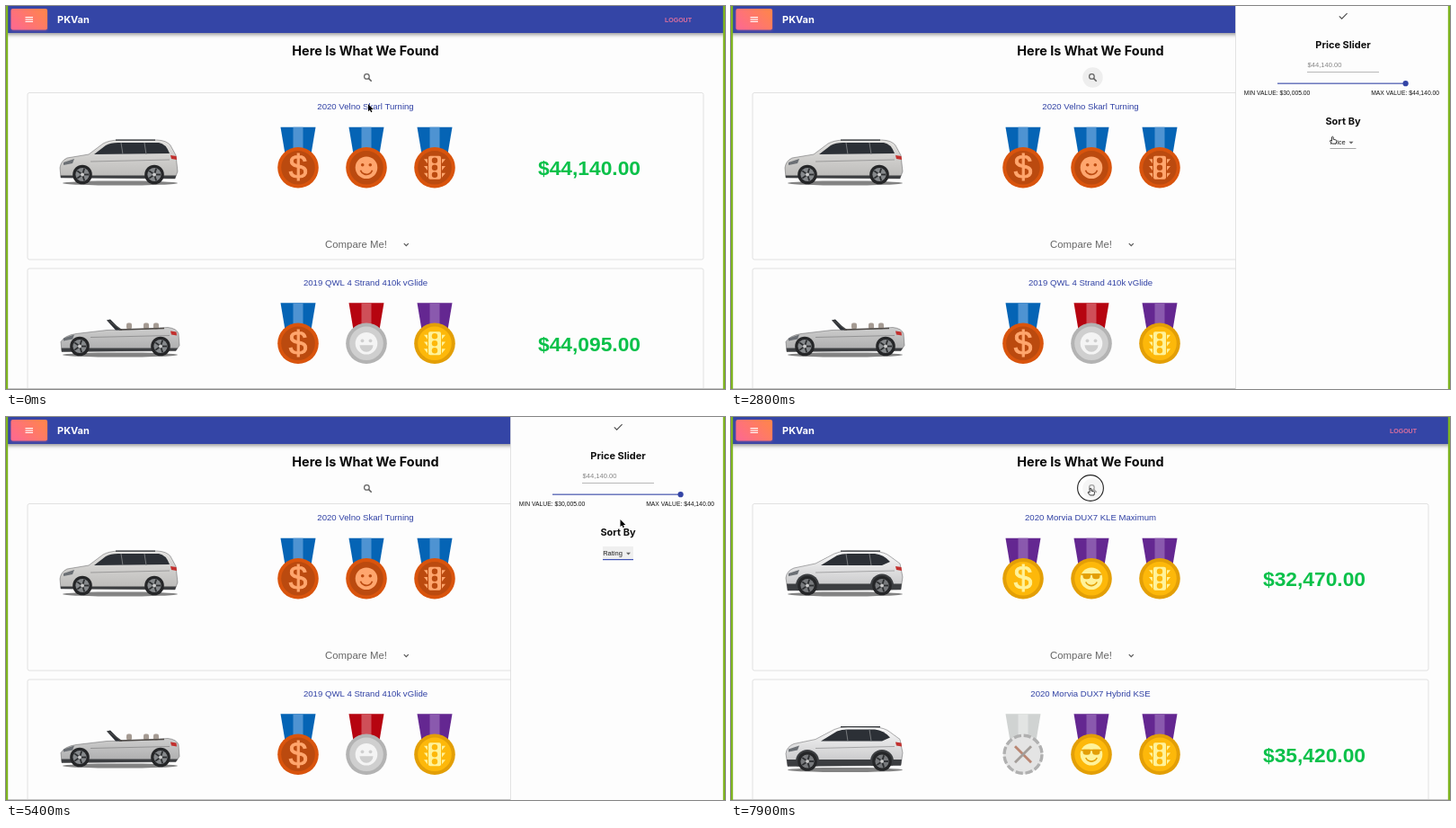
An HTML page with a canvas that plays this animation: 800x426 px, repeating every 8000 ms.

```html
<!DOCTYPE html>
<html lang="en">
<head>
<meta charset="utf-8">
<title>Car results</title>
<style>
html, body { margin: 0; width: 100%; height: 100%; overflow: hidden; background: #fdfdfd; }
canvas { display: block; width: 800px; height: 426px; }
</style>
</head>
<body>
<canvas id="stage"></canvas>
<script>
const W = 800, H = 426, LOOP = 8000, STEP = 100;
const canvas = document.getElementById('stage');
const ctx = canvas.getContext('2d');
const dpr = window.devicePixelRatio || 1;
canvas.width = W * dpr;
canvas.height = H * dpr;

const SANS = '"Liberation Sans", Arial, sans-serif';
const HEAD = 'Inter, "Open Sans", sans-serif';
const BLUE = '#3445a6';

const METALS = {
  bronze: { rim: '#d9540d', inner: '#bb4a0f', mark: '#ffa66e' },
  silver: { rim: '#b3b3b3', inner: '#cfcfcf', mark: '#f4f4f4' },
  gold: { rim: '#e39f06', inner: '#fdb80a', mark: '#fff29a' },
  none: { rim: '#b0b0b0', inner: '#e4e4e4', mark: '#b98672' }
};
const RIBBONS = {
  blue: ['#0564b5', '#4e93d2'],
  red: ['#b60410', '#cf4f58'],
  purple: ['#642791', '#8a59ae'],
  grey: ['#d0d3d2', '#e2e4e3']
};
const BEFORE = [
  { name: '2020 Velno Skarl Turning', price: '$44,140.00', car: 'suv',
    medals: [['bronze', 'blue', 'dollar'], ['bronze', 'blue', 'smile'], ['bronze', 'blue', 'light']] },
  { name: '2019 QWL 4 Strand 410k vGlide', price: '$44,095.00', car: 'open',
    medals: [['bronze', 'blue', 'dollar'], ['silver', 'red', 'grin'], ['gold', 'purple', 'light']] }
];
const AFTER = [
  { name: '2020 Morvia DUX7 KLE Maximum', price: '$32,470.00', car: 'cross',
    medals: [['gold', 'purple', 'dollar'], ['gold', 'purple', 'cool'], ['gold', 'purple', 'light']] },
  { name: '2020 Morvia DUX7 Hybrid KSE', price: '$35,420.00', car: 'cross',
    medals: [['none', 'grey', 'cross'], ['gold', 'purple', 'cool'], ['gold', 'purple', 'light']] }
];

// Car shapes, placed as in the first card
const CARS = {
  suv: {
    body: 'M61 191L60 180Q61 172 68 169L92 165 108 153Q114 149.5 125 149L168 149Q179 149.5 183 155L189 166 191 184 188 192Z',
    glass: 'M98 165L111 155Q116 152 125 152L170 152Q178 153 182 164Z',
    tone: ['#e3e2e0', '#bab9b7'], wheels: [85, 165], wy: 187.5, sill: 4, rim: '#85888b'
  },
  cross: {
    body: 'M63 193L61 179Q62 171 70 168L94 163 115 152Q120 149.5 130 149L160 149.5Q171 150 177 155L188 163 191 178 189 192Z',
    glass: 'M100 165L118 154Q123 152 130 152L160 152Q170 153 177 161L168 165Z',
    tone: ['#f8f8f8', '#c4c4c6'], wheels: [85, 168], wy: 187.5, sill: 7, arch: 13, rim: '#77797c'
  },
  open: {
    body: 'M62 189L61 178Q65 171 78 169L112 165 150 164 180 162Q190 163 192 169L193 182 189 188Z',
    glass: 'M112 154L116 153 128 165 122 165Z',
    tone: ['#dddddc', '#a7a7a8'], wheels: [82, 172], wy: 183, sill: 3, rim: '#85888b'
  }
};

const clamp = v => Math.max(0, Math.min(1, v));
const phase = (t, start, len) => clamp((t - start) / len);
const smooth = p => p * p * (3 - 2 * p);
const easeOut = p => 1 - Math.pow(1 - p, 3);

function text(str, x, y, size, color, opt = {}) {
  ctx.font = `${opt.weight || 400} ${size}px ${opt.family || SANS}`;
  ctx.textAlign = opt.align || 'left';
  ctx.fillStyle = color;
  ctx.fillText(str, x, y);
}
function box(x, y, w, h, color) {
  ctx.fillStyle = color;
  ctx.fillRect(x, y, w, h);
}
function round(x, y, w, h, r) {
  ctx.beginPath();
  ctx.roundRect(x, y, w, h, r);
}
function disc(x, y, r, color) {
  ctx.beginPath();
  ctx.arc(x, y, r, 0, 7);
  ctx.fillStyle = color;
  ctx.fill();
}
function poly(color, ...p) {
  ctx.beginPath();
  for (let i = 0; i < p.length; i += 2) ctx.lineTo(p[i], p[i + 1]);
  ctx.fillStyle = color;
  ctx.fill();
}
function line(color, width, ...p) {
  ctx.beginPath();
  for (let i = 0; i < p.length; i += 2) ctx.lineTo(p[i], p[i + 1]);
  ctx.strokeStyle = color;
  ctx.lineWidth = width;
  ctx.stroke();
}
function shadow(color, blur, y) {
  ctx.shadowColor = color;
  ctx.shadowBlur = blur * dpr;
  ctx.shadowOffsetY = y * dpr;
}
function noShadow() { shadow('transparent', 0, 0); }

const MARKS = {
  dollar(m) {
    text('$', 0, 12.6, 37, m.mark, { align: 'center' });
    ctx.strokeStyle = m.mark;
    ctx.lineWidth = 0.9;
    ctx.strokeText('$', 0, 12.6);
  },
  smile(m) {
    disc(0, 0, 12.3, m.mark);
    disc(-4.3, -3, 1.8, m.inner);
    disc(4.3, -3, 1.8, m.inner);
    ctx.beginPath();
    ctx.arc(0, 0.5, 7, 0.35, Math.PI - 0.35);
    ctx.strokeStyle = m.inner;
    ctx.lineWidth = 1.7;
    ctx.stroke();
  },
  grin(m) {
    disc(0, 0, 12.3, m.mark);
    disc(-4.5, -3, 1.9, m.inner);
    disc(4.5, -3, 1.9, m.inner);
    ctx.beginPath();
    ctx.arc(0, 2, 7.5, 0, Math.PI);
    ctx.fillStyle = m.inner;
    ctx.fill();
  },
  cool(m) {
    disc(0, 0, 12.3, m.mark);
    box(-11.5, -5.5, 23, 1.6, m.rim);
    for (const x of [-9.5, 1]) {
      round(x, -5.5, 8.5, 6, [1, 1, 3.5, 3.5]);
      ctx.fillStyle = m.rim;
      ctx.fill();
    }
    ctx.beginPath();
    ctx.arc(0, 1, 6.8, 0.4, Math.PI - 0.4);
    ctx.strokeStyle = m.rim;
    ctx.lineWidth = 1.6;
    ctx.stroke();
  },
  light(m) {
    for (const y of [-9.5, -1.8, 5.9]) {
      poly(m.mark, -12, y, -8, y, -8, y + 5);
      poly(m.mark, 12, y, 8, y, 8, y + 5);
    }
    round(-7, -13, 14, 26, 2);
    ctx.fillStyle = m.mark;
    ctx.fill();
    for (const y of [-8, 0, 8]) disc(0, y, 3.2, m.inner);
  },
  cross(m) {
    line(m.mark, 2.8, -9, -9, 9, 9);
    line('#a39d99', 2.8, 9, -9, -9, 9);
  }
};

function medal(x, y, [metal, ribbon, mark]) {
  const m = METALS[metal], [dark, pale] = RIBBONS[ribbon];
  ctx.save();
  ctx.translate(x, y);
  poly(dark, -19.5, -45, 19.5, -45, 14.3, -14, -14.3, -14);
  box(-5.5, -45, 11, 30, pale);
  if (metal === 'none') {
    disc(0, 0, 22, m.inner);
    ctx.beginPath();
    ctx.arc(0, 0, 21, 0, Math.PI * 2);
    ctx.setLineDash([8.2, 2.8]);
    ctx.strokeStyle = m.rim;
    ctx.lineWidth = 3.4;
    ctx.stroke();
    ctx.setLineDash([]);
  } else {
    disc(0, 0, 22.8, m.rim);
    disc(0, 0, 18.8, m.inner);
  }
  MARKS[mark](m);
  ctx.restore();
}

function wheel(x, y, rim) {
  disc(x, y, 10.8, '#252628');
  disc(x, y, 7.6, rim);
  for (let i = 0; i < 5; i++) {
    const c = Math.cos(i * Math.PI * 0.4), s = Math.sin(i * Math.PI * 0.4);
    line('#2d2f31', 1.8, x + 2 * c, y + 2 * s, x + 7 * c, y + 7 * s);
  }
  disc(x, y, 1.8, '#ccc');
}

function car(kind) {
  const c = CARS[kind], body = new Path2D(c.body);
  ctx.beginPath();
  ctx.ellipse(127, c.wy + 9.5, 64, 2.6, 0, 0, 7);
  ctx.fillStyle = 'rgba(50,50,50,.6)';
  ctx.fill();
  const g = ctx.createLinearGradient(0, 150, 0, 192);
  g.addColorStop(0, c.tone[0]);
  g.addColorStop(1, c.tone[1]);
  ctx.fillStyle = g;
  ctx.fill(body);
  ctx.save();
  ctx.clip(body);
  box(60, c.wy + 5 - c.sill, 134, c.sill + 2, '#3c3e41');
  if (c.arch) for (const x of c.wheels) disc(x, c.wy, c.arch, '#3c3e41');
  ctx.restore();
  ctx.strokeStyle = 'rgba(70,70,72,.55)';
  ctx.lineWidth = 0.8;
  ctx.stroke(body);
  ctx.fillStyle = '#2c3036';
  ctx.fill(new Path2D(c.glass));
  if (kind === 'open') {
    line('#4a4a4a', 1.2, 113, 154, 129, 165);
    for (const x of [134, 153, 164]) {
      round(x, 157, 6, 7, 2);
      ctx.fillStyle = '#a49a92';
      ctx.fill();
    }
    line('#4d4946', 1.5, 126, 164.5, 176, 163);
  } else {
    for (const x of [128, 154]) line('#777a7d', 1, x, 152, x + 2, 165);
    line('#33363a', 1.2, 122, 149.2, 166, 149.2);
  }
  line('rgba(80,80,82,.45)', 0.9, 94, 173, 182, 171);
  poly('#c2302e', 183, 166, 189.5, 167, 190, 171, 184, 170);
  poly('#6b6f74', 64, 174, 76, 170, 74, 175, 64, 177);
  for (const x of c.wheels) wheel(x, c.wy, c.rim);
}

function card(row, dy) {
  ctx.save();
  ctx.translate(0, dy);
  round(24, 96.5, 752, 185.5, 2);
  ctx.strokeStyle = '#e1e1e1';
  ctx.lineWidth = 1;
  ctx.stroke();
  text(row.name, 400, 115, 9.6, '#3041a4', { align: 'center' });
  car(row.car);
  row.medals.forEach((m, i) => medal(325 + 76 * i, 179.8, m));
  text(row.price, 649, 188.2, 22.8, '#0bc14a', { align: 'center', weight: 700 });
  text('Compare Me!', 355, 269.3, 11.4, '#666');
  line('#555', 1.2, 442.8, 264.2, 445.3, 266.7, 447.8, 264.2);
  ctx.restore();
}

function header() {
  shadow('rgba(0,0,0,.4)', 4, 1.5);
  box(0, 0, W, 30, BLUE);
  shadow('rgba(255,105,135,.35)', 3, 1);
  const g = ctx.createLinearGradient(14, 27, 38, 3);
  g.addColorStop(0, '#fe6b8b');
  g.addColorStop(1, '#ff8350');
  round(5.5, 3, 40.5, 23.5, 2);
  ctx.fillStyle = g;
  ctx.fill();
  noShadow();
  for (const y of [12, 14.4, 16.8]) box(21.5, y, 8.5, 1.1, '#fff');
  text('PKVan', 57, 18.6, 11, '#fff', { weight: 700, family: HEAD });
  text('LOGOUT', 733, 17.5, 7, '#dc6f9e', { weight: 700 });
}

function page(t) {
  box(0, 0, W, H, '#fdfdfd');
  header();
  text('Here Is What We Found', 400, 54.8, 14.4, '#080808', { align: 'center', weight: 700, family: HEAD });
  if ((t >= 500 && t < 3400) || t >= 7700) disc(402.5, 79.5, 11.2, '#eeeeee');
  ctx.beginPath();
  ctx.arc(401.4, 78.4, 2.8, 0, 7);
  ctx.strokeStyle = '#606060';
  ctx.lineWidth = 1.2;
  ctx.stroke();
  line('#606060', 1.5, 403.6, 80.6, 406.7, 83.7);
  (t < 6600 ? BEFORE : AFTER).forEach((row, i) => card(row, 195.5 * i));
  box(0, 425, W, 1, '#c4c4c4');
}

function select(t) {
  const rating = t >= 4900, focus = t >= 3500 && t < 6600;
  const x = rating ? 664 : 666.5, right = rating ? 698 : 695.5;
  if (focus) box(x, 144, right - x, 14.5, '#efefef');
  text(rating ? 'Rating' : 'Price', x + 0.2, 153.8, 7.5, '#222');
  poly('#666', right - 8, 150.8, right - 3, 150.8, right - 5.5, 153.4);
  box(x, 158, right - x, focus ? 1.2 : 0.8, focus ? '#3f51b5' : '#949494');
}

function menu(t) {
  const open = easeOut(phase(t, 3500, 230));
  const shown = open * (1 - phase(t, 4800, 200));
  if (shown <= 0) return;
  ctx.save();
  ctx.globalAlpha = shown * shown;
  ctx.translate(666.5, 139);
  ctx.scale(0.75 + 0.25 * open, 0.5625 + 0.4375 * open);
  shadow('rgba(0,0,0,.4)', 5, 2);
  round(0, 0, 48.5, 59.3, 2);
  ctx.fillStyle = '#fff';
  ctx.fill();
  noShadow();
  const hover = t >= 4200;
  box(0, 4.4, 48.5, 16.8, hover ? '#e1e1e1' : '#ebebeb');
  if (hover) box(0, 21.2, 48.5, 16.8, '#f3f3f3');
  ['Price', 'Rating', 'Efficiency'].forEach((s, i) => text(s, 7.4, 14.9 + 17.1 * i, 7.5, '#222'));
  ctx.restore();
}

function drawer(t) {
  const shift = 238 * (1 - easeOut(phase(t, 1050, 225)) + smooth(phase(t, 6669, 200)));
  if (shift >= 238) return;
  ctx.save();
  ctx.translate(shift, 0);
  box(561.5, 0, 240, H, '#fdfdfd');
  box(561.2, 0, 0.8, H, '#dcdcdc');
  if (t >= 6100) disc(681, 11.3, 11.2, t >= 6500 ? '#c0c0c0' : '#ebebeb');
  line('#4c4c4c', 1.1, 676.8, 11.4, 679.6, 14.2, 685.6, 8.2);
  const head = { align: 'center', weight: 700, family: HEAD };
  text('Price Slider', 681, 46.8, 11, '#111', head);
  text('$44,140.00', 641.5, 68.3, 7.6, '#858585');
  box(641, 73, 80, 0.8, '#a8a8a8');
  box(608, 85.6, 143, 1.1, BLUE);
  disc(750.6, 86.2, 3.1, BLUE);
  text('MIN VALUE: $30,005.00', 570.8, 99.2, 6.77, '#111');
  text('MAX VALUE: $44,140.00', 712.2, 99.2, 6.77, '#111');
  text('Sort By', 681, 132, 11, '#111', head);
  select(t);
  menu(t);
  ctx.restore();
}

// time, x, y of the pointer tip
const TRACK = [
  [0, 403, 109], [500, 402, 79], [1400, 402, 79], [1900, 437.5, 81], [2900, 676, 147],
  [3300, 682.5, 152.5], [3800, 682.5, 152.5], [4500, 686.8, 169.5], [5000, 686.8, 169.5],
  [6000, 677.5, 11.5], [7000, 677.5, 11.5], [7700, 400, 79], [8000, 400, 79]
];
const CLICKS = [800, 3300, 4600, 6400, 7900];
const ARROW = new Path2D('M0 0V8.2L1.9 6.5 3.1 9.3 4.4 8.7 3.2 6H5.8Z');
const HAND = new Path2D('M-.9 5.2V.7Q0-.6.9.7V3.2L3.6 3.8Q4.6 4 4.5 5.2L3.9 8H-.6L-3 5Q-2.6 3.8-1.6 4.6Z');

function pointer(t) {
  let i = 0;
  while (t >= TRACK[i + 1][0]) i++;
  const [t0, x0, y0] = TRACK[i], [t1, x1, y1] = TRACK[i + 1];
  const p = smooth((t - t0) / (t1 - t0));
  const x = x0 + (x1 - x0) * p, y = y0 + (y1 - y0) * p;
  const near = (a, b) => Math.hypot(x - a, y - b) < 12;
  const hand = near(402, 79) || (near(681, 11) && t < 6900) || (x > 662 && y > 138);
  if (CLICKS.some(c => t >= c && t < c + 200)) {
    disc(x, y, 14.4, 'rgba(255,255,255,.4)');
    ctx.strokeStyle = '#222';
    ctx.lineWidth = 1.1;
    ctx.stroke();
  }
  ctx.save();
  ctx.translate(x, y);
  ctx.lineJoin = 'round';
  ctx.lineWidth = hand ? 0.9 : 1;
  ctx.strokeStyle = hand ? '#222' : '#fff';
  ctx.fillStyle = hand ? '#fff' : '#000';
  const shape = hand ? HAND : ARROW;
  if (hand) ctx.fill(shape);
  ctx.stroke(shape);
  if (!hand) ctx.fill(shape);
  ctx.restore();
}

function draw(t) {
  ctx.setTransform(dpr, 0, 0, dpr, 0, 0);
  page(t);
  drawer(t);
  box(0, 0, 2.2, H, '#7fb51f');
  box(797.8, 0, 2.2, H, '#7fb51f');
  pointer(t);
}

function tick() {
  draw(Math.floor((performance.now() % LOOP) / STEP) * STEP);
  requestAnimationFrame(tick);
}
tick();
</script>
</body>
</html>
```
